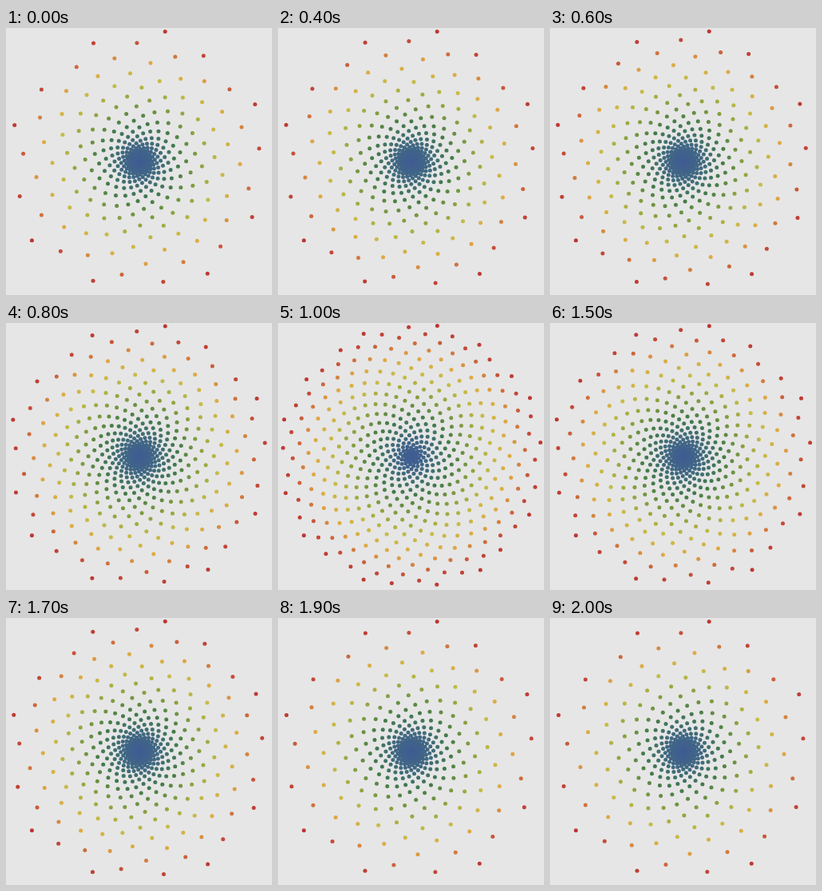
An HTML page with a canvas for the animation above (2400 ms loop, 333x334 px).

```html
<!DOCTYPE html>
<html lang="en">
<head>
<meta charset="utf-8">
<title>Phyllotaxis</title>
<style>
  html, body { margin: 0; width: 100%; height: 100%; overflow: hidden; background: #e6e6e6; }
  canvas { display: block; }
</style>
</head>
<body>
<canvas id="stage" width="333" height="334"></canvas>
<script>
const CENTER = 167, RADIUS = 167, DOT = 2.5, COUNT = 520;
const GOLDEN = Math.PI * (3 - Math.sqrt(5));
const OUTER_ANGLE = 143.7 * Math.PI / 180;
const MAX_GROWTH = 0.0084;
const STEP = 100, LOOP = 2400;

// Colours from the centre outwards, evenly spaced in relative radius.
const ramp = ["#405a98", "#406a7e", "#447c48", "#88a040", "#c6bc46", "#e0a944", "#c44a38", "#b82c30"];
const RAMP_SPACING = 0.15;
const rgb = ramp.map(hex => [1, 3, 5].map(i => parseInt(hex.slice(i, i + 2), 16)));

const ctx = document.getElementById("stage").getContext("2d");
const clamp = x => Math.min(1, Math.max(0, x));

function colorAt(distance) {
  const x = distance / RAMP_SPACING;
  const i = Math.min(Math.floor(x), rgb.length - 2);
  const mixed = rgb[i].map((c, k) => Math.round(c + (rgb[i + 1][k] - c) * (x - i)));
  return `rgb(${mixed})`;
}

// 1 = packed towards the centre, 0 = evenly spaced rings.
function packing(time) {
  const swing = phase => (1 + Math.cos(Math.PI * clamp(phase))) / 2;
  if (time < 400) return 1;
  if (time < 1200) return swing(0.23 + 0.8 * ((time - 300) / 800) ** 2.2);
  if (time < 1300) return 0;
  return 1 - swing((time - 1175) / 800);
}

function draw(time) {
  const growth = Math.max(1e-6, MAX_GROWTH * packing(time));
  ctx.fillStyle = "#e6e6e6";
  ctx.fillRect(0, 0, 333, 334);
  for (let n = 1; n <= COUNT; n++) {
    const distance = Math.expm1(growth * n) / Math.expm1(growth * COUNT);
    const angle = OUTER_ANGLE + (COUNT - n) * GOLDEN;
    const x = CENTER + RADIUS * distance * Math.cos(angle);
    const y = CENTER + RADIUS * distance * Math.sin(angle);
    ctx.fillStyle = colorAt(distance);
    ctx.beginPath();
    ctx.arc(x, y, DOT, 0, 2 * Math.PI);
    ctx.fill();
  }
}

const start = performance.now();
let shown = -1;

function tick() {
  const step = Math.floor(((performance.now() - start) % LOOP) / STEP);
  if (step !== shown) {
    shown = step;
    draw(step * STEP);
  }
  requestAnimationFrame(tick);
}
tick();
</script>
</body>
</html>
```
